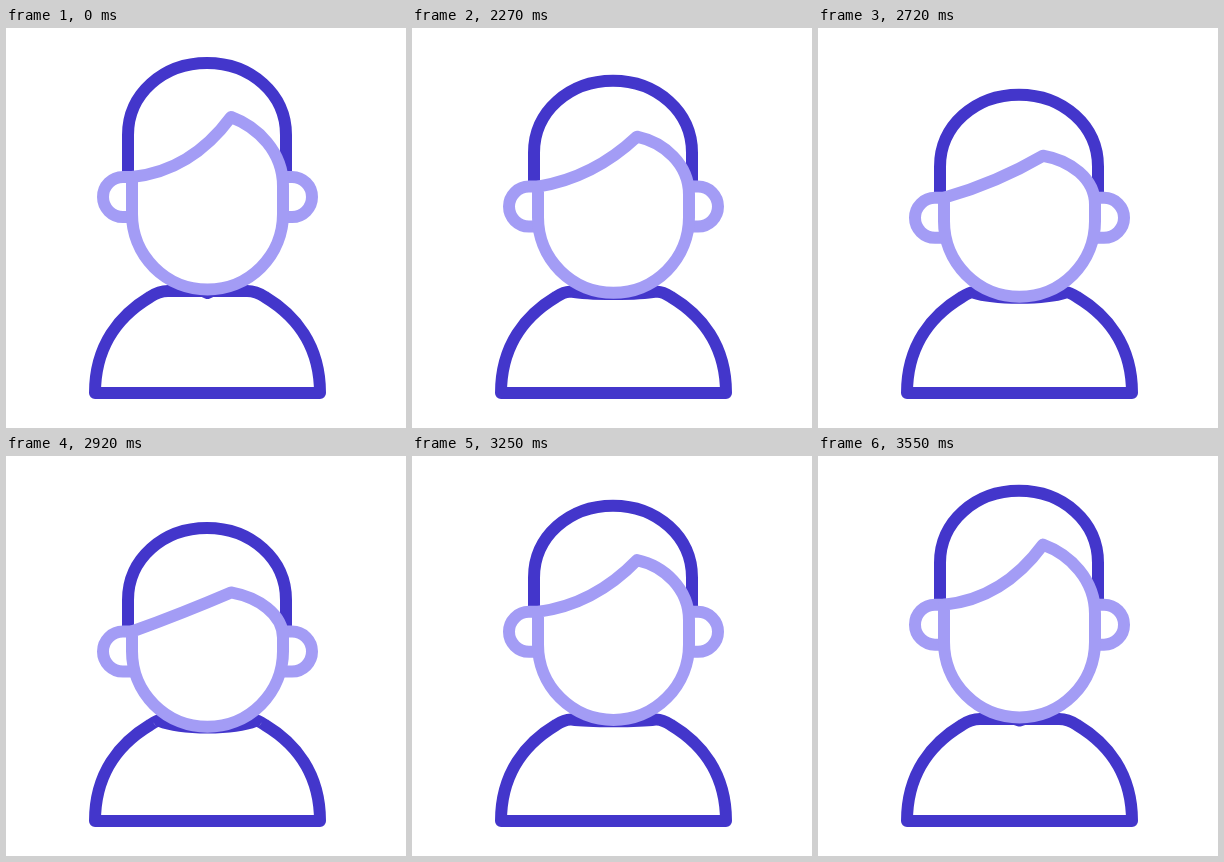
An HTML page that plays this animation: 400x400 px, repeating every 3.57 s.

```html
<!DOCTYPE html>
<html lang="en">
<head>
<meta charset="utf-8">
<title>Bouncing avatar</title>
<style>
  html, body { margin: 0; width: 100%; height: 100%; overflow: hidden; background: #fff; }
  svg { display: block; width: 100vw; height: 100vh; }
  path { fill: none; stroke-width: 12; stroke-linejoin: round; }
  .dark { stroke: #4336cb; }
  .light { stroke: #a39cf5; }
  #face { fill: #fff; }
</style>
</head>
<body>
<svg viewBox="0 0 400 400">
  <path id="body" class="dark"/>
  <path id="hair" class="dark"/>
  <path id="ears" class="light"/>
  <path id="face" class="light"/>
</svg>
<script>
const LOOP = 3570;
const TIMES = [2000, 2100, 2500, 2800, 3090, 3375, 3575];
const FACE = [0, -0.28, 1, 0.44, 1, -0.32, 0];
const HAIR = [0, -0.08, 1, 0.58, 1, -0.12, 0];

// Sine-eased value between neighbouring keys; 0 is upright, 1 is ducked.
function valueAt(keys, t) {
  const i = TIMES.findIndex(time => time > t);
  if (i < 1) return 0;
  const u = (t - TIMES[i - 1]) / (TIMES[i] - TIMES[i - 1]);
  const eased = (1 - Math.cos(Math.PI * u)) / 2;
  return keys[i - 1] + (keys[i] - keys[i - 1]) * eased;
}

function setPath(id, d) {
  document.getElementById(id).setAttribute('d', d);
}

function draw(t) {
  const a = valueAt(FACE, t);
  const b = valueAt(HAIR, t);

  // Shoulders, with a collar pressed down by the chin
  const dip = Math.max(a, 0);
  const notch = 2 * Math.max(0, 1 - Math.abs(a) * 30);
  const edge = 263 + 3 * dip;
  const sag = 263 + 16.3 * dip;
  const left = 162 - 13 * dip;
  const right = 403 - left;
  const collar = notch
    ? `L206 263L201.5 ${263 + notch}L197 263L${left} ${edge}`
    : `C227 ${sag} 176 ${sag} ${left} ${edge}`;
  setPath('body', `M89 365H314C314 317 289 287 259 269Q250 263 ${right} ${edge}
    ${collar}Q153 263 144 269C114 287 89 317 89 365Z`);

  // Hair slides on its own; its ends stay on the ears
  const top = 35 + 49.5 * b;
  const side = top + 72;
  const ear = 149 + 40 * a;
  setPath('hair', `M122 ${ear - 2}V${side}C122 ${top + 31} 157 ${top} 201 ${top}
    S280 ${top + 31} 280 ${side}V${ear - 2}`);

  setPath('ears', `M135 ${ear}H117a20 20 0 0 0 0 40H135
    M268 ${ear}H286a20 20 0 0 1 0 40H268`);

  // Fringe tip, temple and chin
  const tip = 89 + 40 * a + 28 * b;
  const jaw = 186 + 14 * a;
  setPath('face', `M126 ${ear}Q${185 - 10 * b} ${143 + 18.5 * b} 225 ${tip}
    C252 ${99 + 64 * a} 277 ${124 + 51 * a} 277 ${158 + 36 * a}
    V${jaw}A75.5 75.5 0 0 1 126 ${jaw}Z`);
}

function tick() {
  draw(performance.now() % LOOP + 5);
  requestAnimationFrame(tick);
}
tick();
</script>
</body>
</html>
```
